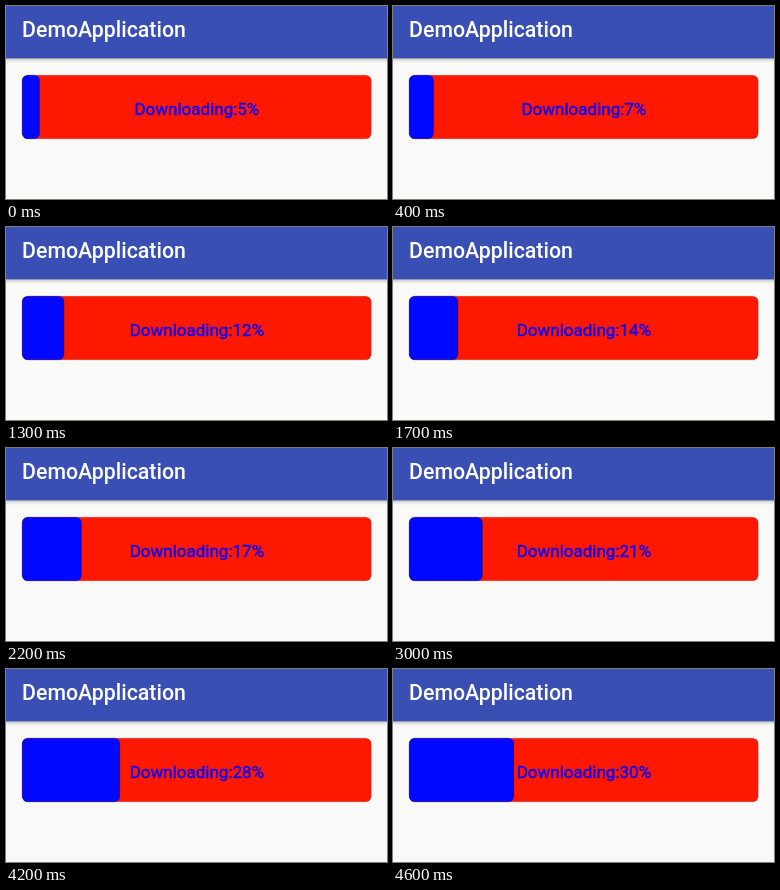
Animation, 381 px wide and 193 px high, one loop 4800 ms. Source, as an HTML page:

```html
<!DOCTYPE html>
<html lang="en">
<head>
<meta charset="utf-8">
<title>Download progress</title>
<style>
html, body { margin: 0; width: 100%; height: 100%; overflow: hidden; background: #f9f9f8; }
svg { display: block; width: 381px; height: 193px; font-family: Roboto, sans-serif; }
.track { stroke: #000; stroke-opacity: .2; stroke-width: .8; }
</style>
</head>
<body>
<svg viewBox="0 0 381 193">
  <defs>
    <linearGradient id="shadow" x2="0" y2="1">
      <stop offset="0" stop-color="#000" stop-opacity=".3"/>
      <stop offset=".4" stop-color="#000" stop-opacity=".1"/>
      <stop offset="1" stop-color="#000" stop-opacity="0"/>
    </linearGradient>
  </defs>
  <rect width="381" height="193" fill="#f9f9f8"/>
  <rect y="52" width="381" height="5" fill="url(#shadow)"/>
  <rect width="381" height="52.3" fill="#3a4fb4"/>
  <text x="16.1" y="31.2" font-size="21.3" font-weight="500" fill="#fff">DemoApplication</text>
  <rect class="track" x="16.2" y="69.2" width="349" height="63.6" rx="5.5" fill="#ff1800"/>
  <rect class="track" id="bar" x="16.2" y="69.2" height="63.6" rx="5.5" fill="#0008ff"/>
  <text id="label" x="190.9" y="109" font-size="17" text-anchor="middle" fill="#1000f4"
    stroke="#1000f4" stroke-width=".45"></text>
</svg>
<script>
const LOOP = 4800, FRAME = 100, FULL_WIDTH = 349;
const FIRST = 5, FRAMES_PER_PERCENT = 1.825, LEAD = 0.175;
const bar = document.getElementById("bar");
const label = document.getElementById("label");
let start;

function draw(now) {
  start ??= now;
  const frame = Math.floor((now - start) % LOOP / FRAME);
  const percent = FIRST + Math.floor((frame + LEAD) / FRAMES_PER_PERCENT);
  bar.setAttribute("width", FULL_WIDTH * percent / 100);
  label.textContent = `Downloading:${percent}%`;
  requestAnimationFrame(draw);
}
requestAnimationFrame(draw);
</script>
</body>
</html>
```
